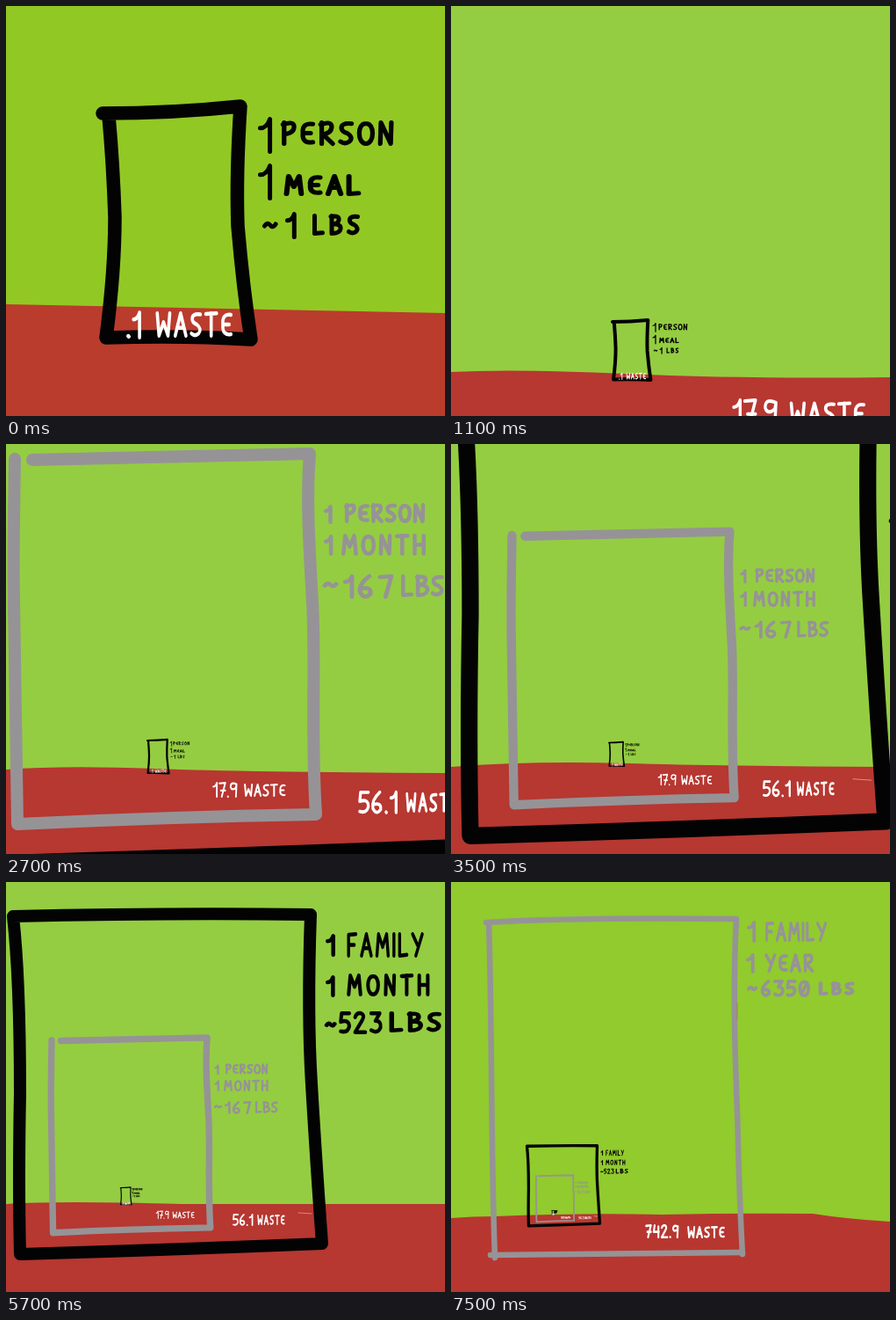
Animation, 500 px wide and 466 px high, one loop 8000 ms. Source, as an HTML page:

```html
<!DOCTYPE html>
<html lang="en">
<head>
<meta charset="utf-8">
<title>Food waste, zooming out</title>
<style>
html, body { margin: 0; width: 100%; height: 100%; overflow: hidden; background: #94cd42; }
svg { display: block; width: 100vw; height: 100vh; }
path { fill: none; stroke-linecap: round; stroke-linejoin: round; }
</style>
</head>
<body>
<svg id="stage" viewBox="0 0 500 466" preserveAspectRatio="none"></svg>
<script>
const BLACK = '#030303', GREY = '#969396', WHITE = '#fff';

// Pen strokes per character in a cell 10 units high: [width, path]. "z" is a crossed 7.
const PEN = {
  P: [5, 'M.5 0V10M0 1Q5 -1 5 2Q5 5 .5 5.5'],
  E: [5, 'M5 .7Q0 0 .5 5Q0 10 5 9.3M.5 5H4'],
  R: [5.5, 'M.5 0V10M0 1Q5 -1 5 2Q5 5 1 5.5L5.5 10'],
  S: [5, 'M5 .5Q0 0 .5 3Q1 4.5 3 5Q6 7 4 9Q2 10.5 0 9'],
  O: [6, 'M3 .5C-1 0 -1 10 3 10C7 10 7 0 3 .5Z'],
  N: [5, 'M0 10L.3 0L4.7 10L5 0'],
  M: [7, 'M0 10L1 0L3.5 6L6 0L7 10'],
  A: [6, 'M0 10L3 0L6 10M1 6.5H5'],
  L: [4.5, 'M0 0V10L4.5 9.6'],
  B: [5.5, 'M.5 0V10M0 .5Q5 -.5 4.5 2.5Q4 4.5 1 4.7Q6 4.5 5.5 7.5Q5 10 .5 10'],
  W: [7, 'M0 0L1 10L3.5 4L6 10L7 0'],
  T: [6, 'M0 .3L6 0M3 0V10'],
  H: [5, 'M0 0V10M5 0V10M0 5H5'],
  F: [5, 'M.5 10V.3L5 0M.5 5H4'],
  I: [0, 'M0 0V10'],
  Y: [6, 'M0 0L3 5M6 0L2 10'],
  0: [6, 'M3 .5C-1 0 -1 10 3 10C7 10 7 0 3 .5ZM5 1L1 9'],
  1: [3, 'M0 2.8Q2 2.8 3 0V10'],
  2: [6, 'M0 2Q1 -.5 3.5 0Q6 1 4 4L0 10H6'],
  3: [5.5, 'M0 0H5L2.5 4Q6 4 5.5 7.5Q4 11 0 9'],
  4: [5.5, 'M1 0L0 5.5H5.5M5 1V10'],
  5: [5, 'M5 0H.5L0 4.5Q5 3 5 7Q4 10.5 0 9.5'],
  6: [5, 'M4 0Q-1 4 0 8Q2 11.5 4.5 8.5Q5 5 .5 6'],
  7: [5, 'M0 .4L5 0L2.5 10'],
  z: [5, 'M0 .4L5 0L2 10M1.3 5.5H5'],
  9: [5, 'M5 1Q0 -1 0 3Q1 6 4.5 3.5L5 1L4.5 10'],
  '.': [.2, 'M0 9.8L.2 10'],
  '~': [6, 'M0 5.5Q1.5 3 3 5T6 4.5']
};

// Each part keeps its own coordinates. Lines: [path, colour, width].
// Words: [text, left, top, height with ink, clear gap, letter breadth].
const PARTS = {
  meal: {
    anchor: [110, 122],
    lines: [['M110 122Q190 122 267 114Q262 190 264 250Q270 320 279 379Q200 374 114 377Q124 300 124 240Q122 180 117 125', BLACK, 15.5]],
    notes: [
      [BLACK, 5, [
        ['1', 287, 126, 42], ['PERSON', 313, 130, 29, 3.8, 1.05],
        ['1', 287, 179, 42], ['MEAL', 317, 191, 25, 4.3, 1.2],
        ['~', 292, 236, 26], ['1', 318, 234, 31], ['LBS', 349, 236, 25, 4.5]]],
      [WHITE, 4.5, [['.', 137, 346, 32], ['1', 143, 346, 33, 0, .8], ['WASTE', 170, 347, 30, 1.7, .8]]]
    ]
  },
  month: {
    anchor: [10, 17],
    lines: [['M10 17C9 90 8 120 9 180S11 330 13 432Q180 424 353 421C347 330 353 250 349 180S342 60 346 11Q180 14 30 18', GREY, 14]],
    notes: [
      [GREY, 4.5, [
        ['1', 362, 69, 22], ['PERSON', 385, 67, 23, 1.4],
        ['1', 362, 103, 24], ['MONTH', 382, 102, 25, 3.5],
        ['~', 361, 149, 22, 0, 1.2], ['167', 384, 148, 28, 5, 1.1], ['LBS', 450, 148, 26, 1.6]]],
      [WHITE, 2.2, [['1z.9', 235, 384, 18, .7, .85], ['WASTE', 271, 386, 15, .8, .9]]]
    ]
  },
  family: {
    anchor: [8, 38],
    lines: [
      ['M8 39Q16 110 16 240Q14 340 16 423Q190 418 360 411Q354 330 348 230Q343 150 347 37Q180 35 8 39', BLACK, 14],
      ['M333 376L348 377', '#d8958a', .7]
    ],
    notes: [
      [BLACK, 4.5, [
        ['1', 364, 59, 26], ['FAMILY', 387, 57, 29, 2, .75],
        ['1', 364, 106, 25], ['MONTH', 388, 104, 26, 4, .9],
        ['~', 363, 153, 18, 0, 1.1], ['523', 379, 147, 26, 2.2, .9], ['LBS', 437, 147, 24, 5, 1.2]]],
      [WHITE, 2, [['56.1', 258, 377, 14, .7, .85], ['WASTE', 286, 378, 12, .4, .7]]]
    ]
  },
  year: {
    anchor: [43, 47],
    lines: [
      ['M43 47C47 150 45 300 50 427M40 46Q140 40 325 42C319 150 327 260 327 300Q329 370 332 423', GREY, 6.5],
      ['M326 138V156', '#b0803a', .8]
    ],
    notes: [
      [GREY, 3.8, [
        ['1', 337, 44, 25], ['FAMILY', 357, 45, 23, 1, .8],
        ['1', 336, 81, 23], ['YEAR', 357, 81, 22, 1.5, .9],
        ['~', 337, 112, 18], ['6350', 353, 111, 20, 2], ['LBS', 419, 113, 16, 3.5, 1.2]]],
      [WHITE, 2.4, [['WASTE', 269, 391, 14, .6, .85]]]
    ]
  },
  total: {
    anchor: [43, 47],
    lines: [['M45 424Q190 422 332 421', GREY, 6.5]],
    notes: [[WHITE, 2.6, [['z42.9', 221, 389, 16, .6, .8]]]]
  }
};

const MID = ['#94cd42', '#b73731'];
// Each scene: length in ms, [sky, soil], ground line, and parts as [name, x, y, scale].
const SCENES = [
  { ms: 500, tone: ['#92c824', '#ba3c2d'], ground: 'M0 339L500 349',
    parts: [['meal', 110, 122, 1]] },
  { ms: 1000, tone: MID, ground: 'M0 416Q70 412 200 418T500 422',
    parts: [['month', -89.5, -222, 1.82], ['meal', 184, 359, .257]] },
  { ms: 2000, tone: MID, ground: 'M0 370Q65 365 170 369T500 374',
    parts: [['family', -79, -257, 1.92], ['month', 10, 17, 1], ['meal', 161, 337, .145]] },
  { ms: 1000, tone: MID, ground: 'M0 367Q90 360 200 363T500 367',
    parts: [['family', 11, -84, 1.375], ['month', 69.5, 104, .738], ['meal', 179.8, 339.5, .104]] },
  { ms: 2000, tone: MID, ground: 'M0 366Q60 362 200 366H500',
    parts: [['family', 8, 38, 1], ['month', 52, 180, .527], ['meal', 130.3, 347.5, .075]] },
  { ms: 1000, tone: MID, ground: 'M0 366Q200 369 330 367H500',
    parts: [['total', -1.5, -317, 2.07], ['family', 91, 207, .488], ['month', 112, 276, .256], ['meal', 150.5, 358.5, .038]] },
  { ms: 500, tone: ['#91cb2d', '#b73730'], ground: 'M0 382Q25 380 50 380Q150 376 240 378Q330 376 412 377Q450 383 500 386',
    parts: [['year', 43, 47, 1], ['total', 43, 47, 1], ['family', 86.5, 300, .236], ['month', 97, 334, .126], ['meal', 115, 373.5, .018]] }
];

const stage = document.getElementById('stage');

function add(parent, tag, attrs) {
  const el = document.createElementNS('http://www.w3.org/2000/svg', tag);
  for (const key in attrs) el.setAttribute(key, attrs[key]);
  return parent.appendChild(el);
}

function write(parent, color, weight, ink, [text, left, top, height, gap = 0, breadth = 1]) {
  const unit = (height - weight) / 10;
  const word = add(parent, 'g', { role: 'img', 'aria-label': text.replace('z', '7') });
  let x = left + weight / 2;
  for (const char of text) {
    const [width, d] = PEN[char];
    add(word, 'path', {
      d, stroke: color, 'stroke-width': ink / unit,
      transform: `translate(${x} ${top + weight / 2}) scale(${unit * breadth} ${unit})`
    });
    x += width * breadth * unit + weight + gap;
  }
}

function place(parent, [name, x, y, scale]) {
  const { anchor, lines, notes } = PARTS[name];
  const group = add(parent, 'g', {
    transform: `translate(${x} ${y}) scale(${scale}) translate(${-anchor[0]} ${-anchor[1]})`
  });
  // Keep far-away ink from fading out.
  const ink = (width, least) => Math.max(width, least / scale);
  for (const [d, stroke, width] of lines)
    add(group, 'path', { d, stroke, 'stroke-width': ink(width, .9) });
  for (const [color, weight, words] of notes)
    for (const word of words) write(group, color, weight, ink(weight, .6), word);
}

const views = SCENES.map(({ tone, ground, parts }) => {
  const view = add(stage, 'g', { visibility: 'hidden' });
  add(view, 'rect', { width: 500, height: 466, fill: tone[0] });
  add(view, 'path', { d: ground + 'V466H0Z', style: `fill:${tone[1]}` });
  parts.forEach(part => place(view, part));
  return view;
});

const LOOP = SCENES.reduce((sum, scene) => sum + scene.ms, 0);
const start = performance.now();
let shown = -1;

function draw() {
  let left = (performance.now() - start) % LOOP;
  let now = 0;
  while (left >= SCENES[now].ms) left -= SCENES[now++].ms;
  if (now !== shown) {
    views.forEach((view, i) => view.setAttribute('visibility', i === now ? 'visible' : 'hidden'));
    shown = now;
  }
  requestAnimationFrame(draw);
}
draw();
</script>
</body>
</html>
```
